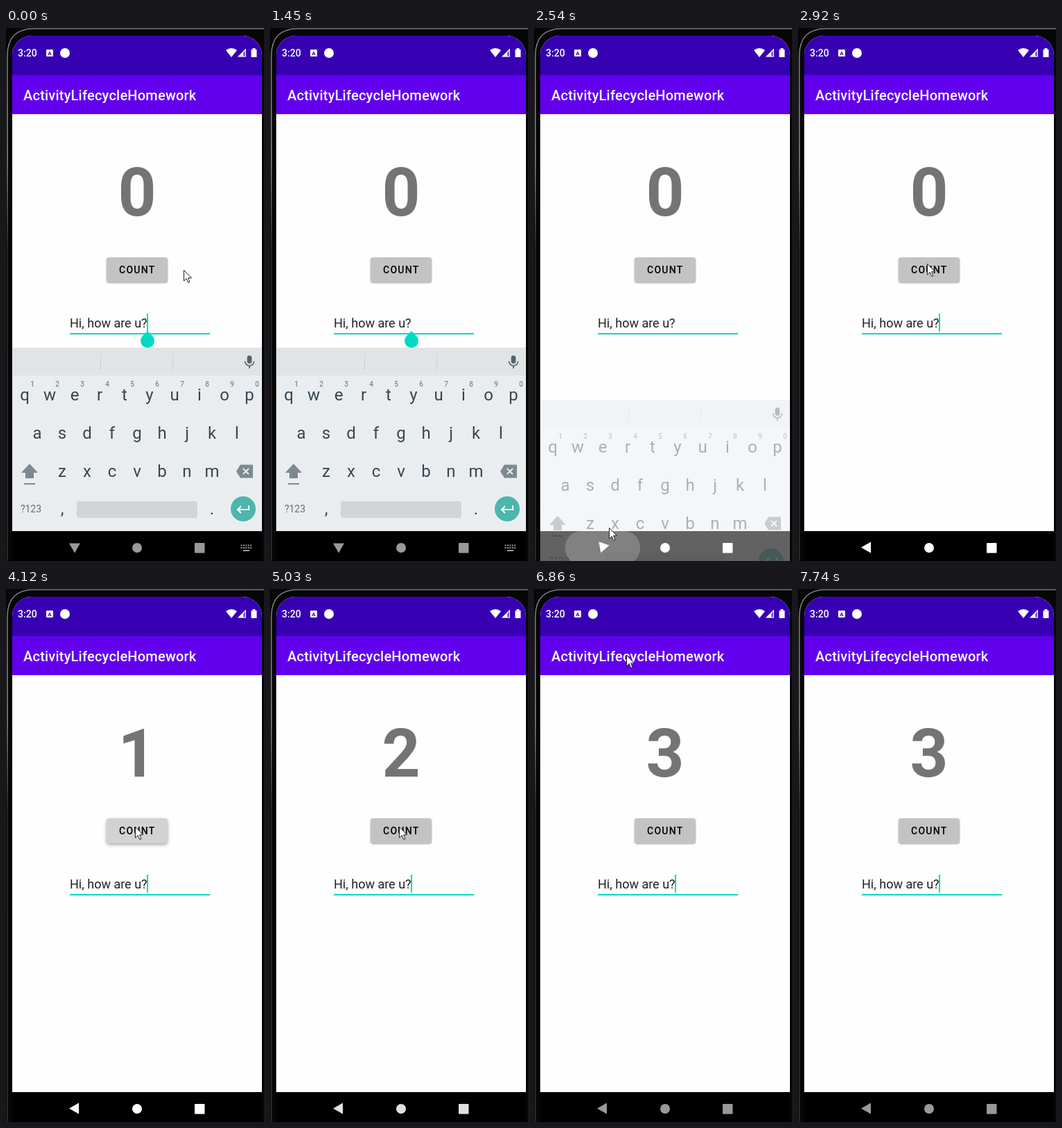
An HTML page for the animation above (8 s loop, 372 by 767 pixels).

```html
<!DOCTYPE html>
<html lang="en">
<head>
<meta charset="utf-8">
<title>Counter app</title>
<style>
html, body { margin: 0; width: 100%; height: 100%; overflow: hidden; background: #000; }
svg { display: block; width: 372px; height: 767px; font-family: Roboto, sans-serif; }
.keys { font-size: 24px; fill: #37474f; text-anchor: middle; }
.hint { font-size: 10px; fill: #5f6d74; }
</style>
</head>
<body>
<svg viewBox="0 0 372 767">
  <defs>
    <clipPath id="screen"><path d="M9 767V39a28 28 0 0 1 28-28H341a28 28 0 0 1 28 28V767Z"/></clipPath>
    <linearGradient id="rim" gradientUnits="userSpaceOnUse" x1="0" y1="0" x2="0" y2="767">
      <stop offset="0" stop-color="#777"/><stop offset=".25" stop-color="#888"/>
      <stop offset=".42" stop-color="#2a2a2a"/><stop offset="1" stop-color="#333"/>
    </linearGradient>
  </defs>

  <rect width="372" height="767" fill="#060606"/>
  <path d="M2 767V40Q2 1 40 1H372" fill="none" stroke="url(#rim)" stroke-width="1.6"/>

  <g clip-path="url(#screen)">
    <rect x="9" y="11" width="360" height="756" fill="#fefefe"/>
    <rect x="9" y="11" width="360" height="57" fill="#3700b3"/>
    <rect x="9" y="68" width="360" height="56" fill="#6200ee"/>

    <g fill="#fff">
      <text x="17" y="41" font-size="14" font-weight="500">3:20</text>
      <rect x="58" y="31" width="10" height="10" rx="1"/>
      <text x="63" y="39" font-size="8" font-weight="700" text-anchor="middle" style="fill:#3700b3">A</text>
      <circle cx="85" cy="36" r="7"/>
      <path d="M325 42L317 32Q325 26 333 32Z"/>
      <path d="M334 41.5L346 29.5V41.5Z" fill-opacity=".35"/>
      <path d="M334 41.5L346 29.5V41.5ZM342 35.500V40.500H345V32.500Z" fill-rule="evenodd"/>
      <path d="M353.500 31H355.500V29H359.500V31H361.500V42H353.500Z"/>
      <text x="25" y="104" font-size="20" font-weight="500" letter-spacing=".2">ActivityLifecycleHomework</text>
    </g>

    <text id="count" x="189" y="270" font-size="96" font-weight="700" text-anchor="middle" fill="#747474">0</text>
    <rect id="button" x="145" y="330" width="88" height="36" rx="4"/>
    <text x="163" y="353" font-size="14" font-weight="500" letter-spacing="1.25">COUNT</text>

    <text x="92" y="431" font-size="18" fill="#222">Hi, how are u?</text>
    <g fill="#03dac5">
      <rect x="92" y="439" width="202" height="2"/>
      <rect id="caret" x="203" y="411" width="2" height="26"/>
      <path id="handle" d="M204 436L211 443A10 10 0 1 1 197 443Z"/>
    </g>

    <g id="keyboard">
      <rect x="9" y="460" width="360" height="264" fill="#e9edf0"/>
      <rect x="9" y="460" width="360" height="40" fill="#e0e4e7"/>
      <path d="M136.500 469V493M240.500 469V493" stroke="#cbd0d3"/>
      <g fill="none" stroke="#56656b" stroke-width="1.7">
        <rect x="348.500" y="472" width="5" height="10" rx="2.500" fill="#56656b"/>
        <path d="M344.500 479.500a6.500 6.500 0 0 0 13 0M351 486V490"/>
      </g>
      <g id="keys" class="keys"></g>
      <g fill="#7c8a90">
        <path d="M34 627L46 640H40V648H28V640H22Z"/>
        <rect x="26" y="655" width="16" height="2"/>
        <path d="M332 638L338 628.500H356V647.500H338Z"/>
      </g>
      <path d="M342 634L350 642M350 634L342 642" stroke="#e9edf0" stroke-width="2"/>
      <rect x="102" y="681" width="174" height="24" rx="4" fill="#d0d5d8"/>
      <circle cx="342" cy="692" r="18" fill="#4db6ac"/>
      <path d="M350 687V693H334M339 688L334 693L339 698" fill="none" stroke="#fff" stroke-width="2"/>
    </g>

    <rect id="bar" x="9" y="724" width="360" height="43"/>
    <rect id="ripple" y="724" height="48" rx="23" fill="#fff"/>
    <g id="nav">
      <path id="back" d="M91 747.500L105 739.500V755.500Z"/>
      <circle cx="189" cy="748" r="7"/>
      <rect x="272" y="741" width="14.500" height="14.500" rx="1"/>
    </g>
    <g id="imeIcon" stroke="#999" stroke-width="2" stroke-dasharray="2 1.400">
      <path d="M338.500 744.500H354M338.500 748H354"/>
      <path d="M342 752H351" stroke-dasharray="none"/>
    </g>
  </g>

  <path id="mouse" d="M.5 .5V16L4.200 12.500L6.700 18.500L9 17.500L6.600 11.700H11.500Z" fill="#fff" stroke="#222" stroke-linejoin="round"/>
</svg>

<script>
const LOOP = 8000;
const el = id => document.getElementById(id);

// Keyboard labels
function label(text, x, y, attrs = "") {
  return `<text x="${x}" y="${y}" ${attrs}>${text}</text>`;
}
const row = (letters, x, y, attrs) => [...letters].map((c, i) => label(c, x + 36 * i, y, attrs)).join("");
el("keys").innerHTML =
  row("qwertyuiop", 27, 536) + row("1234567890", 38, 516, 'class="hint"') +
  row("asdfghjkl", 45, 591) + row("zxcvbnm", 81, 646) +
  label("?123", 36, 697, 'style="font-size:14px;fill:#5f6d74"') +
  label(",", 81, 700) + label(".", 297, 700);

// Each entry changes part of the state from its time on.
const timeline = [
  [0, { mouse: [256, 348], caret: 1, handle: 1, count: 0, press: 0, slide: 0, fade: 1,
        bar: 1, ripple: [48, 102, 0], light: 153, turn: -90, ime: 1 }],
  [120, { mouse: [240, 348] }],
  [240, { mouse: [217, 349] }],
  [360, { mouse: [201, 349], caret: 0 }],
  [740, { mouse: [274, 358] }],
  [880, { mouse: [291, 365], caret: 1 }],
  [1300, { caret: 0 }],
  [1450, { mouse: null }],
  [1870, { mouse: [101, 742], caret: 1 }],
  [2020, { mouse: [101, 740], handle: 0 }],
  [2140, { mouse: [101, 739] }],
  [2280, { caret: 0, ripple: [58, 82, .1], light: 160 }],
  [2400, { ripple: [48, 102, .16], light: 185 }],
  [2540, { mouse: [108, 719], slide: 75, fade: .42, bar: .6, ripple: [45, 108, .2], light: 255, turn: -70, ime: 0 }],
  [2670, { mouse: [146, 560], slide: 190, fade: .1, bar: .8, ripple: [45, 108, .1], turn: -25 }],
  [2790, { mouse: [180, 390], fade: 0, bar: 1, ripple: [45, 108, 0], turn: 0 }],
  [2920, { mouse: [186, 339], caret: 1 }],
  [3330, { mouse: [186, 342], caret: 0, press: .6 }],
  [3600, { count: 1, press: 1 }],
  [3720, { caret: 1, press: 0 }],
  [4120, { press: 1 }],
  [4240, { count: 2, caret: 0, press: .15 }],
  [4390, { press: 0 }],
  [4760, { caret: 1 }],
  [5030, { light: 225 }],
  [5280, { caret: 0, light: 170 }],
  [5400, { press: 1, light: 156 }],
  [5540, { count: 3, press: .6, light: 153 }],
  [5660, { caret: 1, press: 0 }],
  [6200, { caret: 0 }],
  [6570, { mouse: [178, 308] }],
  [6740, { mouse: [158, 200], caret: 1 }],
  [6860, { mouse: [133, 95] }],
  [6980, { mouse: [111, 17] }],
  [7240, { mouse: [54, -6], caret: 0 }],
  [7360, { mouse: null }],
  [7740, { caret: 1 }]
];

const show = (id, visible) => el(id).setAttribute("visibility", visible ? "visible" : "hidden");
const gray = v => `rgb(${v},${v},${v})`;

function render(t) {
  const s = {};
  for (const [start, change] of timeline) if (start <= t) Object.assign(s, change);

  show("caret", s.caret);
  show("handle", s.handle);
  show("imeIcon", s.ime);
  show("mouse", s.mouse);
  if (s.mouse) el("mouse").setAttribute("transform", `translate(${s.mouse})`);

  el("count").textContent = s.count;
  el("button").setAttribute("fill", gray(Math.round(195 + 15 * s.press)));
  el("button").style.filter =
    `drop-shadow(0 ${1 + 1.5 * s.press}px ${1 + 1.5 * s.press}px rgba(0,0,0,.35))`;

  el("keyboard").setAttribute("transform", `translate(0 ${s.slide})`);
  el("keyboard").setAttribute("opacity", s.fade);

  const [x, width, opacity] = s.ripple;
  el("ripple").setAttribute("x", x);
  el("ripple").setAttribute("width", width);
  el("ripple").setAttribute("opacity", opacity);
  el("bar").setAttribute("opacity", s.bar);
  el("nav").setAttribute("fill", gray(s.light));
  el("back").setAttribute("transform", `rotate(${s.turn} 99 747.5)`);
}

const begin = performance.now();
function tick() {
  render((performance.now() - begin) % LOOP);
  requestAnimationFrame(tick);
}
tick();
</script>
</body>
</html>
```
